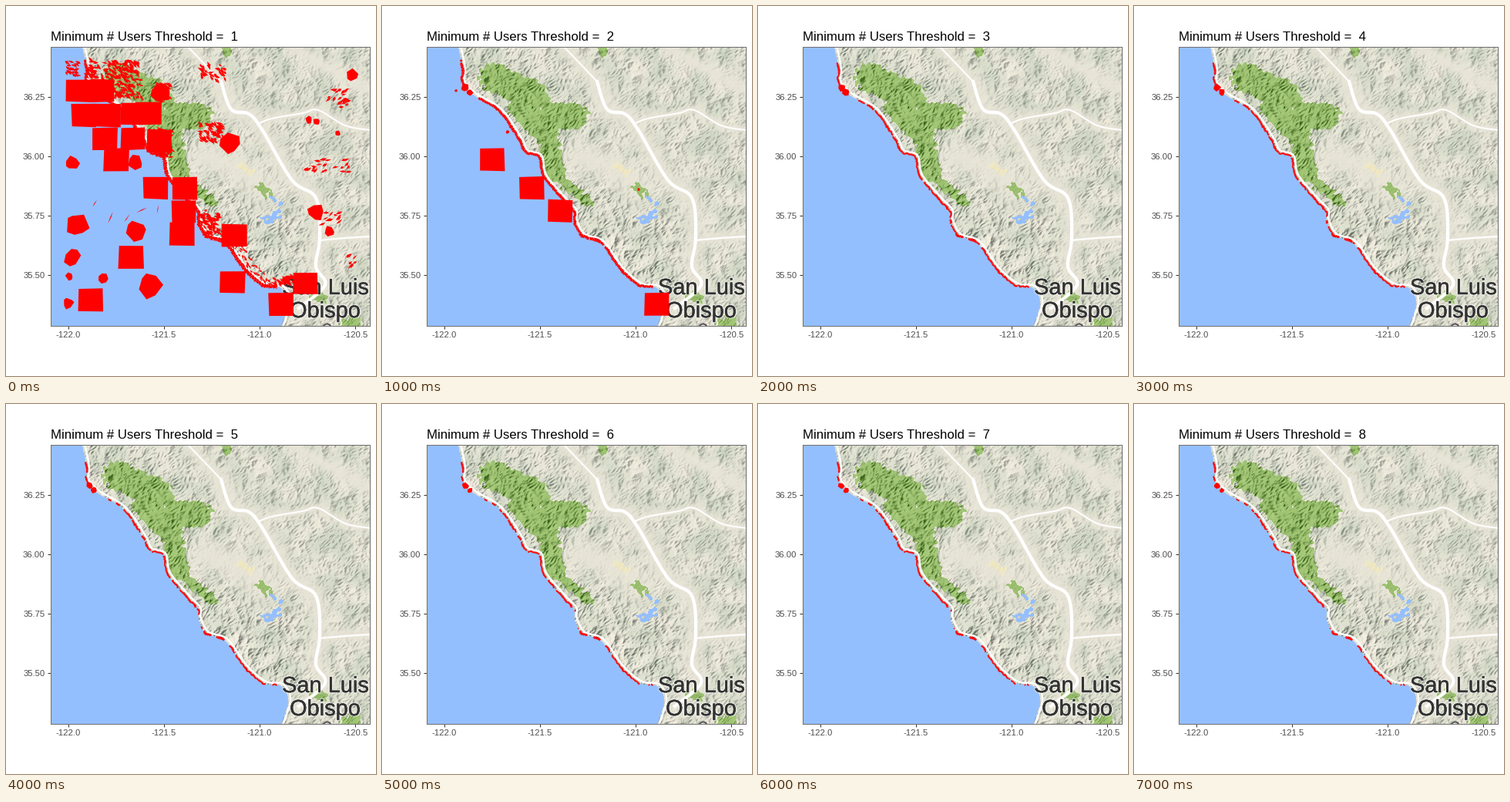
Recreate the animation shown at these times as a matplotlib script. Size 480 px wide and 480 px high, loop 8000 ms.

```python
import numpy as np
import matplotlib.pyplot as plt
from matplotlib.animation import FuncAnimation
from matplotlib.collections import LineCollection, PolyCollection
from matplotlib.patheffects import Normal, Stroke

PX = 0.9  # points per pixel at 80 dpi
X0, Y0, W, H = 58, 53, 414, 362
LEVELS = 8
RED, SEA, INK = "#ff0000", "#94bfff", "#333333"
SEA_RGB, GREEN_RGB, SAND_RGB = (148, 191, 255), (157, 193, 113), (241, 233, 196)
rng = np.random.default_rng(11)
plt.rcParams["font.family"] = "Liberation Sans"


def smooth(keys, n=10):
    """Catmull-Rom curve through a few key points."""
    p = np.array([keys[0], *keys, keys[-1]], float)
    t = np.linspace(0, 1, n, endpoint=False)[:, None]
    parts = [b + t / 2 * (c - a + t * (2 * a - 5 * b + 4 * c - d
                                       + t * (3 * (b - c) + d - a)))
             for a, b, c, d in zip(p, p[1:], p[2:], p[3:])]
    return np.vstack(parts + [p[-1:]])


def resample(p, step):
    s = np.r_[0, np.cumsum(np.hypot(*np.diff(p, axis=0).T))]
    t = np.arange(0, s[-1], step)
    return np.c_[np.interp(t, s, p[:, 0]), np.interp(t, s, p[:, 1])]


COAST = smooth([(99, 53), (105, 84), (104, 99), (118, 115), (152, 136),
                (178, 173), (186, 189), (204, 196), (210, 221), (234, 250),
                (249, 266), (250, 280), (260, 298), (284, 307), (310, 342),
                (334, 362), (357, 366), (366, 385), (357, 416)])
NORTH = smooth([(236, 53), (262, 80), (281, 100)])
HIGHWAY = smooth([(279, 98), (292, 134), (315, 140), (332, 160), (371, 226),
                  (402, 249), (407, 300), (402, 338), (414, 362), (380, 392)])
EAST = smooth([(326, 153), (345, 146), (385, 139), (405, 135), (440, 155),
               (473, 161)])
SPUR = smooth([(406, 304), (440, 301), (473, 299)])
ROADS = [(COAST + (3, -2.2), 2.4), (HIGHWAY, 4.2), (NORTH, 2), (EAST, 2),
         (SPUR, 2.2)]

# Patches of colour: both ends of a stroke and its radius.
WOODS = [(145, 93, 198, 118, 19), (182, 130, 212, 160, 18),
         (217, 142, 250, 143, 17), (212, 160, 225, 215, 13),
         (228, 222, 268, 255, 6), (285, 53, 287, 60, 5),
         (330, 235, 340, 243, 5), (400, 377, 411, 378, 6),
         (442, 413, 452, 411, 8)]
LAKES = [(331, 275, 356, 272, 1.5), (341, 280, 352, 268, 4),
         (345, 250, 357, 256, 2)]
SANDS = [(305, 207, 317, 215, 4)]

# Centres of the photo footprints; the first few stay for a second level.
SQUARES = [(143, 199), (194, 236), (231, 266), (357, 387), (94, 110),
           (125, 110), (101, 142), (133, 142), (165, 140), (185, 139),
           (128, 172), (165, 172), (199, 175), (232, 237), (228, 296),
           (162, 326), (110, 381), (294, 358), (388, 360), (296, 298)]
BLOBS = [(92, 284, 15), (168, 292, 13), (187, 361, 18), (85, 203, 10),
         (86, 326, 11), (125, 353, 7), (82, 351, 5), (81, 386, 8),
         (291, 178, 14), (402, 268, 11), (450, 90, 9), (430, 165, 4),
         (393, 148, 5), (403, 150, 5), (419, 292, 7), (169, 203, 10),
         (201, 112, 13)]
# Centre, half width, half height and count of the slivers.
CLUSTERS = [(86, 80, 8, 10, 25), (112, 82, 9, 12, 35), (150, 81, 22, 10, 75),
            (150, 105, 26, 14, 95), (202, 112, 11, 12, 35),
            (205, 178, 11, 18, 60), (268, 87, 16, 12, 32),
            (266, 164, 15, 12, 65), (265, 283, 12, 13, 55),
            (360, 356, 14, 6, 30), (431, 120, 14, 12, 22),
            (415, 208, 30, 10, 22), (423, 276, 15, 8, 12),
            (448, 332, 5, 8, 7)]

GRID = np.stack(np.meshgrid(np.arange(W) + X0 + 0.5,
                            np.arange(H) + Y0 + 0.5), -1).reshape(-1, 2)


def distance(line):
    d = np.full(len(GRID), 1e9)
    for a, b in zip(line[:-1], line[1:]):
        ab = b - a
        t = np.clip((GRID - a) @ ab / max(ab @ ab, 1e-9), 0, 1)
        d = np.minimum(d, np.hypot(*(GRID - a - t[:, None] * ab).T))
    return d.reshape(H, W)


def band(size, stretch=1.0):
    """Unit noise with features near one size, drawn out along the ridges."""
    ky, kx = np.meshgrid(np.fft.fftfreq(H), np.fft.fftfreq(W), indexing="ij")
    f = np.hypot(stretch * (kx + ky), (ky - kx) / stretch) / np.sqrt(2)
    keep = np.exp(-((f * size - 1) / 0.5) ** 2)
    n = np.fft.ifft2(np.fft.fft2(rng.normal(size=(H, W))) * keep).real
    return n / n.std()


def patch(strokes, rough):
    """Mask of round strokes with a frayed edge."""
    fray = rough * band(9)
    mask = np.zeros((H, W), bool)
    for x1, y1, x2, y2, r in strokes:
        mask |= distance(np.array([(x1, y1), (x2, y2)], float)) < r + fray
    return mask


def terrain():
    height = (-abs(band(40, 1.3)) - 0.6 * abs(band(20, 1.1))
              - 0.42 * abs(band(10, 0.8)) - 0.16 * abs(band(5, 0.8)))
    gy, gx = np.gradient(height)
    lit = gx + 0.6 * gy
    lit = np.clip(lit / lit.std(), -2.4, 2.2)

    basin = smooth([(262, 198), (300, 208), (335, 240)], 3)
    plain = smooth([(375, 53), (425, 85), (473, 108)], 3)
    flat = np.zeros((H, W))
    for line, width in [(NORTH[::5], 11), (HIGHWAY[::5], 15), (EAST[::5], 7),
                        (SPUR[::5], 9), (basin, 24), (plain, 10)]:
        flat = np.maximum(flat, np.exp(-(distance(line) / width) ** 2))

    # The coastal range is the steepest part.
    steep = 0.8 + 0.45 * np.exp(-(distance(COAST[::5]) / 90) ** 2)
    relief = ((1 - 0.92 * flat) * steep)[..., None]
    sage = np.clip(0.5 + 0.35 * band(50), 0, 1)[..., None] * (1 - flat[..., None])
    rgb = (1 - sage) * [232, 229, 215] + sage * [210, 215, 197]
    rgb[patch(WOODS, 1.6)] = GREEN_RGB
    rgb[patch(SANDS, 1.5)] = SAND_RGB
    rgb += relief * (np.clip(lit, 0, 3)[..., None] * 5
                     - np.clip(-lit, 0, 3)[..., None] * [36, 34, 32])
    rgb[patch(LAKES, 1.2)] = SEA_RGB
    return np.clip(rgb, 0, 255).astype(np.uint8)


def square(x, y):
    corners = np.array([(-1, -1), (1, -1), (1, 1), (-1, 1)]) * (16, 14.5)
    return corners + (x, y) + rng.uniform(-1, 1, (4, 2))


def blob(x, y, r):
    a = np.sort(np.arange(7) + rng.uniform(-0.3, 0.3, 7)) * 2 * np.pi / 7
    r = r * rng.uniform(0.7, 1.15, 7)
    return np.c_[x + r * np.cos(a), y + r * np.sin(a)]


def sliver(x, y, size, angle, thin=0.4):
    a = np.radians(angle + rng.normal(0, 22))
    u, v = np.array([np.cos(a), np.sin(a)]), np.array([-np.sin(a), np.cos(a)])
    r = size * rng.uniform(0.4, 1, 4)
    return np.array([u * r[0], v * r[1] * thin, -u * r[2], -v * r[3] * thin]) + (x, y)


def cluster(x, y, rx, ry, count):
    angle = 35 if x < 380 else -25
    return [sliver(x + rx * dx, y + ry * dy, 5.5, angle)
            for dx, dy in rng.uniform(-1, 1, (count, 2))]


def footprints(level):
    shapes = []
    if level == 1:
        shapes += [square(*c) for c in SQUARES] + [blob(*b) for b in BLOBS]
        for c in CLUSTERS:
            shapes += cluster(*c)
        shapes += [sliver(x, rng.uniform(250, 290), 9, 110, 0.1)
                   for x in np.linspace(115, 197, 5)]
        # Strands inland of the southern shore.
        south = MID[(MID[:, 1] > 270) & (MID[:, 0] < 352)]
        shapes += [sliver(*(p + rng.uniform(2, 17) * np.array([0.8, -0.6])), 4, 45)
                   for p in south]
    elif level == 2:
        shapes += [square(*c) for c in SQUARES[:4]]
        shapes += [blob(163, 163, 2.5), blob(96, 110, 2), blob(333, 238, 2)]
    # Headland at the north end, shrinking slowly.
    grow = 1.25 - 0.35 * (level - 1) / (LEVELS - 1)
    shapes += [blob(108, 106, 4.6 * grow), blob(114, 112, 4 * grow)]
    return PolyCollection(shapes, facecolors=RED, edgecolors="none", zorder=6)


def shore(level):
    """Coast strip, thinner and more broken as the threshold rises."""
    x, y = MID.T
    need = 0.42 * (1 - np.exp(-(level - 1) / 3))
    keep = (y > 70) & (x < 352) & (SCORE > need)
    if level > 1:
        keep &= (x < 108) | (x > 126)
    width = 1.8 + 1.7 * SCORE - 0.08 * level + 0.9 * (level <= 2)
    width = width + 0.8 * ((x > 259) & (x < 283))
    if level == 1:
        width = width + 1.2 * (y > 195)
    return LineCollection(SEGMENTS[keep], linewidths=width[keep] * PX,
                          colors=RED, zorder=6)


track = resample(COAST, 1.8)
track += rng.normal(0, 0.6, track.shape)
SEGMENTS = np.stack([track[:-1], track[1:]], 1)
MID = SEGMENTS.mean(1)
SCORE = np.convolve(rng.uniform(0, 1, len(MID) + 2), [0.3, 0.4, 0.3], "valid")
SCORE[(MID[:, 0] > 246) & (MID[:, 0] < 257)] *= 0.6

fig = plt.figure(figsize=(6, 6), dpi=80, facecolor="white")
ax = fig.add_axes([X0 / 480, 1 - (Y0 + H) / 480, W / 480, H / 480])
ax.imshow(terrain(), extent=(X0, X0 + W, Y0 + H, Y0), aspect="auto",
          interpolation="nearest")
ax.fill(*np.vstack([COAST, [(50, 416), (50, 50)]]).T, color=SEA, lw=0, zorder=2)
for line, width in ROADS:
    ax.plot(*line.T, color="white", lw=width * PX, zorder=3)

halo = [Stroke(linewidth=3 * PX, foreground=(1, 1, 1, 0.5)),
        Stroke(linewidth=0.35 * PX, foreground=INK), Normal()]
for x, y, word in [(358, 374, "San Luis"), (368, 404, "Obispo")]:
    ax.text(x, y, word, size=29 * PX, color=INK, path_effects=halo,
            zorder=4, clip_on=True)
ax.plot(416, 417, "o", ms=10 * PX, mfc="#eeeeee", mec="#555555",
        mew=2 * PX, zorder=4)

layers = [(footprints(n), shore(n)) for n in range(1, LEVELS + 1)]
for pair in layers:
    for item in pair:
        ax.add_collection(item, autolim=False)

ax.set(xlim=(X0, X0 + W), ylim=(Y0 + H, Y0))
steps = np.arange(4)
ax.set_xticks(80.6 + 124.2 * steps, [f"{-122 + 0.5 * n:.1f}" for n in steps])
ax.set_yticks(118.3 + 76.8 * steps, [f"{36.25 - 0.25 * n:.2f}" for n in steps])
ax.tick_params(length=3.6 * PX, width=PX, color=INK, pad=3.8 * PX,
               labelsize=11.2 * PX, labelcolor="#4d4d4d")
for spine in ax.spines.values():
    spine.set(edgecolor="#707070", linewidth=PX, zorder=9)
title = fig.text(X0 / 480, 1 - 45 / 480, "", size=16.8 * PX, color="black")


def update(i):
    title.set_text(f"Minimum # Users Threshold =  {i + 1}")
    for k, pair in enumerate(layers):
        for item in pair:
            item.set_visible(k == i)
    return [title]


anim = FuncAnimation(fig, update, frames=LEVELS, interval=1000, repeat=True,
                     repeat_delay=0)
plt.show()
```
